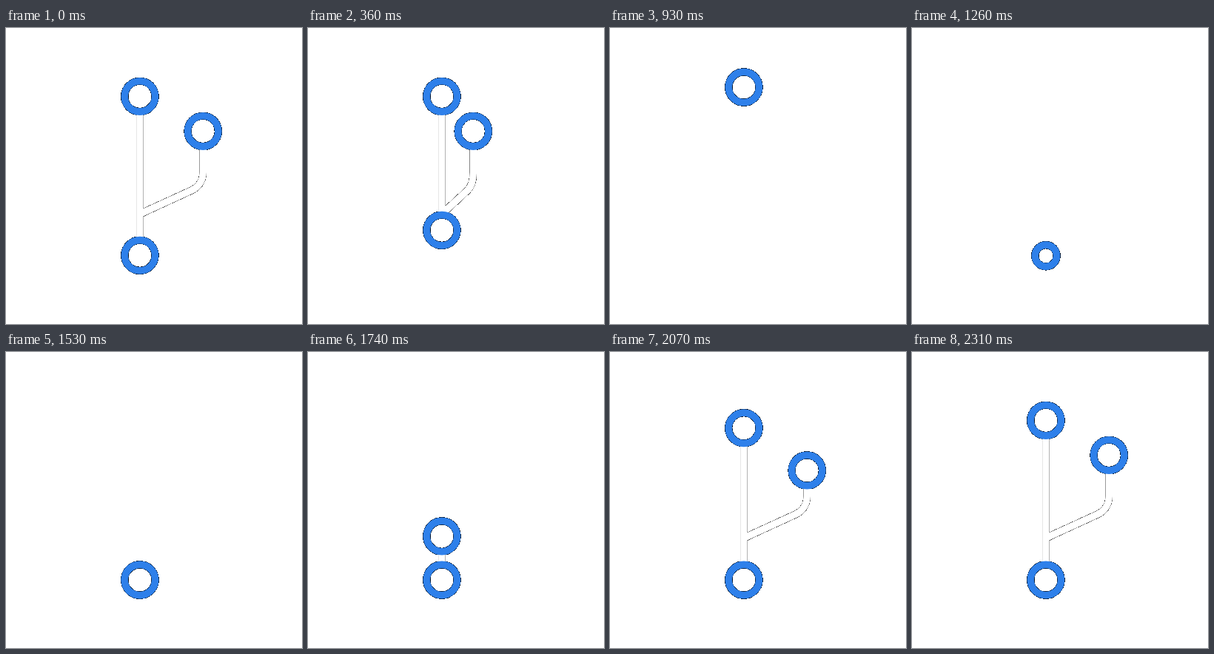
An HTML page with a canvas for the animation above (2340 ms loop, 400 by 400 pixels).

```html
<!DOCTYPE html>
<html lang="en">
<head>
<meta charset="utf-8">
<style>
  html, body { margin: 0; width: 100%; height: 100%; overflow: hidden; background: #fff; }
  canvas { display: block; }
</style>
</head>
<body>
<canvas width="400" height="400"></canvas>
<script>
const LOOP = 2340, SIZE = 400;
const STEM_X = 180.9, BRANCH_X = 266.2;
const TOP = 92.4, SIDE = 139.4, JOINT = 251.4, PEAK = 76.6;
const RADIUS = 20.65, STROKE = 9.7, LINE = 9.6;

const ctx = document.querySelector('canvas').getContext('2d', { willReadFrequently: true });
const measure = document.createElementNS('http://www.w3.org/2000/svg', 'path');

const mix = (a, b, k) => a + (b - a) * k;

// Eased progress from start to end: cubic-bezier(1/3, 0, c, 1); c = 2/3 is smoothstep.
function ease(t, start, end, c = 2 / 3) {
  const p = Math.min(1, Math.max(0, (t - start) / (end - start)));
  let lo = 0, hi = 1;
  for (let i = 0; i < 24; i++) {
    const s = (lo + hi) / 2, r = 1 - s;
    if (r * r * s + 3 * r * s * s * c + s ** 3 < p) lo = s; else hi = s;
  }
  return lo * lo * (3 - 2 * lo);
}

// The hole is cut out, so a ring hides whatever lies behind it.
function ring(x, y, radius = RADIUS) {
  ctx.beginPath();
  ctx.arc(x, y, radius, 0, 2 * Math.PI);
  ctx.globalCompositeOperation = 'destination-out';
  ctx.fill();
  ctx.globalCompositeOperation = 'source-over';
  ctx.strokeStyle = '#2e80ea';
  ctx.lineWidth = STROKE;
  ctx.stroke();
}

function line(path, length) {
  ctx.strokeStyle = '#fff';
  ctx.lineWidth = LINE;
  ctx.setLineDash(length === undefined ? [] : [length, 999]);
  ctx.stroke(new Path2D(path));
  ctx.setLineDash([]);
}

const stem = (y1, y2) => line(`M${STEM_X} ${y1}V${y2}`);

// Branch from the joint up to the side node, squeezed to fit both ends.
function branchPath(sideX, sideY, jointY) {
  const at = (x, y) => `${mix(STEM_X, sideX, (x - STEM_X) / (BRANCH_X - STEM_X))} ` +
    mix(sideY, jointY, (y - SIDE) / (JOINT - SIDE));
  return `M${at(STEM_X, JOINT)}L${at(250.5, 219.5)}` +
    `C${at(260.5, 214.9)} ${at(BRANCH_X, 205.5)} ${at(BRANCH_X, 195)}L${at(BRANCH_X, SIDE)}`;
}

function collapse(t) {
  const sideX = mix(BRANCH_X, STEM_X, ease(t, 120, 600));
  const sideY = mix(SIDE, TOP, ease(t, 450, 720));
  const y = mix(307.3, TOP, ease(t, 238, 726));
  stem(TOP, y);
  if (y > sideY) line(branchPath(sideX, sideY, Math.min(JOINT, y)));
  ring(sideX, sideY);
  ring(STEM_X, TOP);
  ring(STEM_X, y);
}

function hop(t) {
  const fall = Math.min(1, Math.max(0, (t - 1060) / 170)) ** 2;
  const y = mix(mix(TOP, PEAK, ease(t, 726, 1020)), 307.8, fall);
  const squash = ease(t, 1190, 1260) - ease(t, 1260, 1400);
  ring(STEM_X, y, RADIUS - 6 * squash);
}

function grow(t) {
  const base = 308;
  const y = mix(base, TOP, ease(t, 1604, 2288, 0.05));
  const progress = ease(t, 1745, 2310, 0.17);
  stem(base, y);
  if (progress > 0) {
    const path = branchPath(BRANCH_X, SIDE, JOINT);
    measure.setAttribute('d', path);
    const length = measure.getTotalLength() * progress;
    const tip = measure.getPointAtLength(length);
    line(path, length);
    ring(tip.x, tip.y);
  }
  ring(STEM_X, y);
  ring(STEM_X, base);
}

// Soft edge pixels become opaque over black, which gives the thin dark outline.
function darkenEdges() {
  const image = ctx.getImageData(0, 0, SIZE, SIZE), d = image.data;
  for (let i = 0; i < d.length; i += 4) {
    const a = d[i + 3];
    if (a === 255) continue;
    for (let c = i; c < i + 3; c++) d[c] = a > 25 ? d[c] * a / 255 : 255;
    d[i + 3] = 255;
  }
  ctx.putImageData(image, 0, 0);
}

function draw() {
  const t = performance.now() % LOOP;
  ctx.clearRect(0, 0, SIZE, SIZE);
  (t < 726 ? collapse : t < 1500 ? hop : grow)(t);
  darkenEdges();
  requestAnimationFrame(draw);
}
draw();
</script>
</body>
</html>
```
